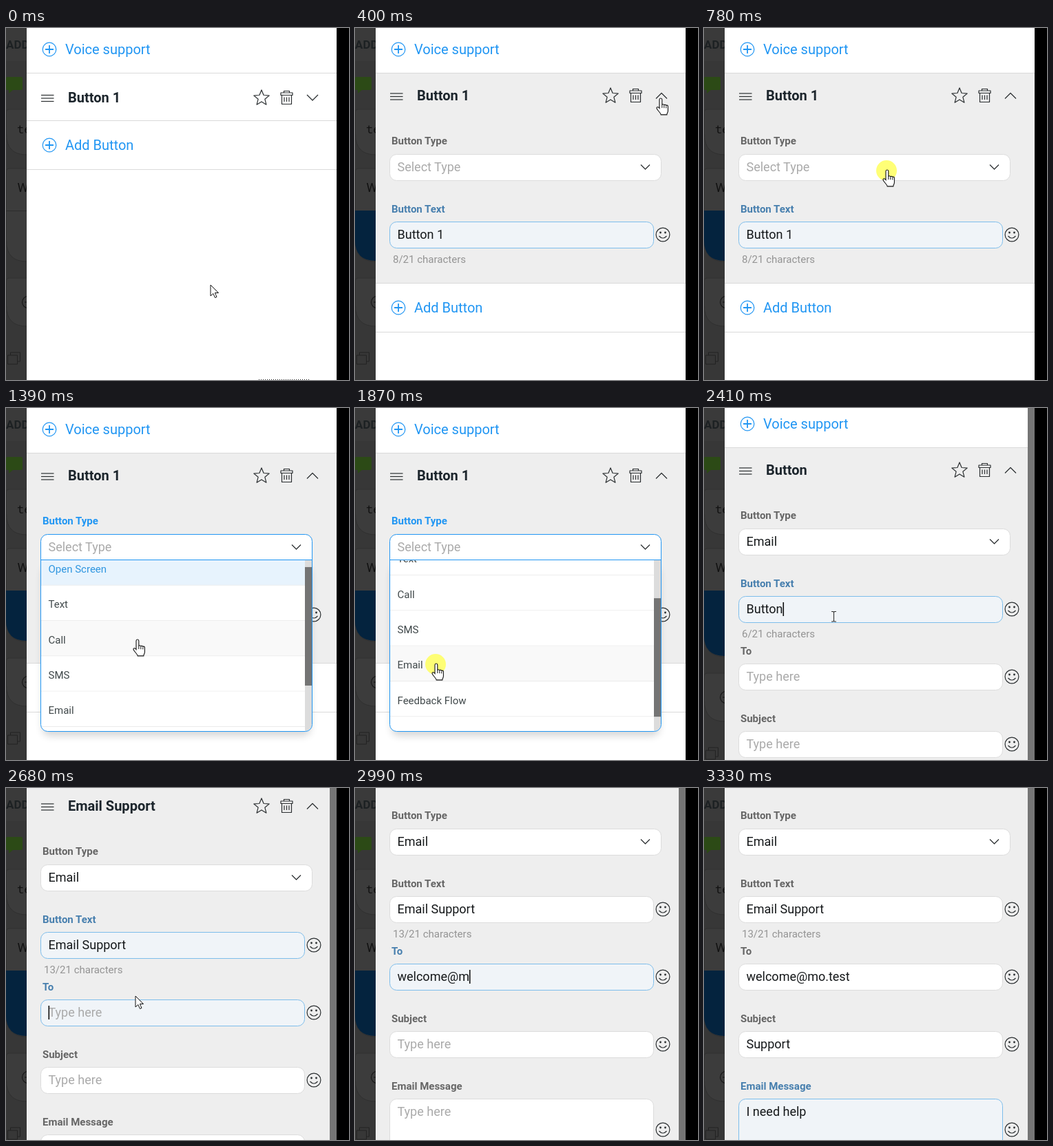
These frames come from a looping animation (498 px wide and 511 px high, 3410 ms). An HTML page:

```html
<!DOCTYPE html>
<html lang="en">
<head>
<meta charset="utf-8">
<title>Button editor</title>
<style>
  html, body { margin: 0; width: 100%; height: 100%; overflow: hidden; background: #000; }
  svg { display: block; width: 100vw; height: 100vh; font-family: Roboto, Arial, sans-serif; }
  .link { font-size: 20px; fill: #2196f3; }
  .title { font-size: 20px; font-weight: 700; fill: #1c252c; }
  .label { font-size: 15px; font-weight: 700; fill: #666; }
  .label.on { fill: #477fae; }
  .label.open { fill: #2196f3; }
  .value { font-size: 18px; fill: #15181a; }
  .hint { fill: #aaa; }
  .count { font-size: 15px; fill: #949494; }
  .item { font-size: 15px; fill: #41494b; }
  .icon { fill: none; stroke: #2b2f31; stroke-width: 1.2; stroke-linejoin: round; }
  .blue { fill: none; stroke: #2196f3; stroke-width: 1.2; }
</style>
</head>
<body>
<svg id="stage" viewBox="0 0 498 511">
  <defs>
    <clipPath id="list"><path d="M51 221H444V459a10 10 0 0 1-10 10H61a10 10 0 0 1-10-10z"/></clipPath>
    <clipPath id="strip"><rect width="30" height="511"/></clipPath>
    <clipPath id="panel"><rect x="30" width="450" height="511"/></clipPath>
    <filter id="soft" x="-10%" y="-10%" width="120%" height="120%"><feGaussianBlur stdDeviation="6"/></filter>
  </defs>
  <g id="back" clip-path="url(#strip)"></g>
  <g id="front" clip-path="url(#panel)"></g>
  <g id="mouse"></g>
</svg>
<script>
const LOOP = 3410;
const TIMES = [0, 90, 170, 240, 320, 400, 480, 550, 640, 710, 780, 860, 930, 1010, 1080, 1160,
  1240, 1310, 1390, 1470, 1550, 1630, 1710, 1790, 1870, 1960, 2030, 2110, 2190, 2260,
  2350, 2430, 2510, 2600, 2680, 2740, 2800, 2880, 2950, 3030, 3100, 3180, 3250, 3330];

// Steps at which the interface changes
const EXPAND = 5, OPEN = 11, CHOOSE = 25, FORM = 26;
const CLICKS = [4, 10, 24, 29];
const SCROLL = [[0, 0], [28, 8], [33, 40], [34, 72], [35, 98], [36, 124]];
const LIST = [[0, 0], [16, 6], [17, 14.5], [19, 30], [20, 50], [21, 68], [22, 80.5]];
const FOCUS = [[0, ''], [EXPAND, 'text'], [OPEN, ''], [29, 'text'], [34, 'text to'], [35, 'to'], [40, 'subject'], [42, 'message']];
const TYPED = {
  text: [[0, 'Button 1'], [30, 'Button'], [31, 'Ema'], [32, 'Email Sup'], [33, 'Email Support']],
  to: [[0, ''], [37, 'welc'], [38, 'welcome@m'], [39, 'welcome@mo.test']],
  subject: [[0, ''], [40, 'Sup'], [41, 'Support']],
  message: [[0, ''], [42, 'I need'], [43, 'I need help']]
};
const POINTER = [
  [0, 297, 373, 'arrow'], [3, 420, 140, 'arrow'], [4, 444, 101, 'hand'], [5, 444, 103, 'hand'],
  [7, 410, 165, 'arrow'], [9, 285, 200, 'hand'], [10, 266, 207, 'hand'], [11, 264, 208, 'hand'],
  [13, 249, 225, 'arrow'], [14, 240, 250, 'hand'], [18, 191, 337, 'hand'], [23, 118, 372, 'hand'],
  [25, 118, 372, 'arrow'], [28, 186, 303, 'beam'], [29, 189, 302, 'beam'], [31, 188, 302, 'none'],
  [33, 188, 302, 'arrow'], [36, 188, 302, 'none']
];
const SHAPES = {
  arrow: '<path d="M0 0V16L3.8 12.5L6.5 18.5L9 17.4L6.4 11.5H11.5Z" fill="#fff" stroke="#111"/>',
  hand: '<path d="M-2 1c0-2.6 3.8-2.6 3.8 0v8c0-1.8 3-1.6 3 .4c0-1.6 3-1.4 3 .5c0-1.4 2.6-1 2.6 1v6c0 3-1.6 3.6-1.6 6h-8.6c0-2-4.6-6-6-9c-.9-2 1.8-3.4 3.8-.4z" fill="#fff" stroke="#111" stroke-width="1.1"/><path d="M1.8 9v4M4.8 9.6v3.6M7.8 10.4v3" stroke="#111"/>',
  beam: '<path d="M-3.5-6.5H-1L0-5.5L1-6.5H3.5M0-5.5V7M-3.5 8H-1L0 7L1 8H3.5" fill="none" stroke="#333" stroke-width="1.1"/>',
  none: ''
};
const ITEMS = ['Open Screen', 'Text', 'Call', 'SMS', 'Email', 'Feedback Flow', 'Share'];
const ROW = 51.3;

const $ = id => document.getElementById(id);
const pen = document.createElement('canvas').getContext('2d');
const last = (list, i) => list.filter(e => e[0] <= i).pop();
const pick = (list, i) => last(list, i)[1];

const text = (x, y, cls, str) => `<text x="${x}" y="${y}" class="${cls}">${str}</text>`;
const rect = (x, y, w, h, fill, more = '') => `<rect x="${x}" y="${y}" width="${w}" height="${h}" fill="${fill}" ${more}/>`;
const path = (d, cls = 'icon') => `<path d="${d}" class="${cls}"/>`;
const rule = y => rect(30, y, 450, 1, '#dadada');

function link(y, str) {
  return `<circle cx="63" cy="${y}" r="9.8" class="blue"/>` +
    `<path d="M57 ${y}H69M63 ${y - 6}V${y + 6}" class="blue" style="stroke-width:1.8"/>` +
    text(86, y + 7, 'link', str);
}

function star(x, y) {
  const pts = Array.from({ length: 10 }, (_, k) => {
    const r = k % 2 ? 5.2 : 11.8, a = k * Math.PI / 5;
    return [x + r * Math.sin(a), y + .7 - r * Math.cos(a)].map(n => n.toFixed(1)).join(' ');
  });
  return path(`M${pts.join('L')}Z`);
}

function header(y, str, open) {
  const m = y + (open ? 1.5 : 1), c = open ? y + 4.5 : y - 4, tip = open ? -8 : 8;
  return [-4.5, 0, 4.5].map(d => path(`M51 ${m + d}H69.5`)).join('') +
    text(90, y + 7, 'title', str) + star(371, y) +
    path(`M399 ${y - 7}H416V${y - 3.5}H399ZM403.5 ${y - 7}V${y - 9.5}H411.5V${y - 7}` +
      `M400.5 ${y - 3.5}V${y + 9.5}H414.5V${y - 3.5}M404 ${y - .5}V${y + 6}M407.5 ${y - .5}V${y + 6}M411 ${y - .5}V${y + 6}`) +
    path(`M437 ${c}L445 ${c + tip}L453 ${c}`);
}

function smile(y) {
  return `<circle cx="447" cy="${y}" r="9.9" class="icon"/>` +
    `<circle cx="443.5" cy="${y - 3}" r="1.4" fill="#2b2f31"/><circle cx="450.5" cy="${y - 3}" r="1.4" fill="#2b2f31"/>` +
    path(`M441.5 ${y + 2}Q447 ${y + 8} 452.5 ${y + 2}`);
}

function field(i, key, label, y, h = 38) {
  const words = pick(FOCUS, i).split(' '), on = words.includes(key), str = pick(TYPED[key], i);
  let out = text(53, y - 13, on ? 'label on' : 'label', label) +
    rect(50.5, y + .5, 383, h, on ? '#f0f4f8' : '#fff', `rx="10" stroke="${on ? '#7dbdeb' : '#dcdcdc'}"`) +
    text(61.5, y + 25, str ? 'value' : 'value hint', str || 'Type here') +
    smile(h > 38 ? y + 45 : y + 19);
  if (i >= 29 && i < 43 && words[words.length - 1] === key) {
    pen.font = '18px Roboto, Arial, sans-serif';
    out += rect(61.5 + pen.measureText(str).width, y + 9, 1.6, 20, '#111');
  }
  return out;
}

function select(i) {
  const open = i >= OPEN && i < CHOOSE, done = i >= CHOOSE;
  return text(53, 169, open ? 'label open' : 'label', 'Button Type') +
    rect(50.5, 183.5, 394, 38, '#fff', 'rx="10" stroke="#dcdcdc"') +
    text(61.5, 208, done ? 'value' : 'value hint', done ? 'Email' : 'Select Type') +
    path('M415 198.5L421.5 205L428 198.5');
}

function dropdown(i, py) {
  const top = 221 - pick(LIST, i);
  const rows = ITEMS.map((str, k) => {
    const y = top + k * ROW, over = py > 221 && py >= y && py < y + ROW;
    const fill = k === 0 ? '#e7f3fd' : over ? '#f9f9f9' : '#fff';
    return rect(51, y, 383, ROW, fill) + rect(51, y + ROW - 1, 383, 1, '#ebebeb') +
      `<text x="61.5" y="${y + 32.5}" class="item"${k ? '' : ' style="fill:#2f96e0"'}>${str}</text>`;
  }).join('');
  return rect(53, 230, 389, 246, '#000', 'rx="10" opacity=".16" filter="url(#soft)"') +
    rect(50.5, 183.5, 394, 286, '#fff', 'rx="10"') +
    text(61.5, 208, 'value hint', 'Select Type') + path('M415 198.5L421.5 205L428 198.5') +
    `<g clip-path="url(#list)">${rows}${rect(434, 221, 10, 248, '#dcdcdc')}` +
    `${rect(434, 221 + (221 - top) * .685, 10, 172, '#747474')}</g>` +
    rect(50.5, 183.5, 394, 286, 'none', 'rx="10" stroke="#2196f3"') + rect(51, 220, 393, 1, '#2196f3');
}

function panel(i, py) {
  const open = i >= EXPAND, form = i >= FORM, name = pick(TYPED.text, i);
  let out = link(31, 'Voice support');
  if (!open) {
    out += rule(65) + header(101, name, false) + rule(134) + link(170, 'Add Button') + rule(205) +
      '<path d="M367 510.5H441" stroke="#222" stroke-dasharray="1 2"/>';
  } else {
    out += rect(30, 66, 450, form ? 800 : 304, '#eee') + rule(65) + header(98, name, true) +
      select(i) + field(i, 'text', 'Button Text', 281) +
      text(55, 341, 'count', `${name.length}/21 characters`);
    out += form
      ? field(i, 'to', 'To', 379) + field(i, 'subject', 'Subject', 477) + field(i, 'message', 'Email Message', 575, 90)
      : rule(370) + link(406, 'Add Button') + rule(441);
    if (i >= OPEN && i < CHOOSE) out += dropdown(i, py);
  }
  return rect(30, 0, 450, 511, '#fff') + `<g transform="translate(0 ${-pick(SCROLL, i)})">${out}</g>` +
    (form ? rect(470, 0, 10, 511, '#757575') : '');
}

function backdrop(i) {
  const grow = i >= FORM ? 22 : 0, blue = i >= EXPAND;
  const card = (y, end, fill) =>
    `<path d="M40 ${y}H4Q.5 ${y} .5 ${y + 4}V${end - 30}Q.5 ${end} 30 ${end}H40Z" fill="${fill}" stroke="#303030"/>`;
  const dark = (x, y, size, str, more = '') => `<text x="${x}" y="${y}" font-size="${size}" fill="#121212" ${more}>${str}</text>`;
  const line = 'fill="none" stroke="#1a1a1a" stroke-width="1.2"';
  return rect(0, 0, 30, 511, '#373737') + rect(0, 0, 30, 48, '#3a3a3a') +
    dark(0, 30, 17, 'ADD', 'font-weight="700" style="fill:#1d2123"') +
    '<path d="M2 71H22Q24 71 24 73V88Q24 90 22 90H10L4 95V90H2Q0 90 0 88V73Q0 71 2 71Z" fill="#2c4a16"/>' +
    card(118, 184, '#3c3c3c') + dark(16, 153, 17, 'te', 'font-family="Noto Sans Mono, monospace"') +
    card(204, 339 + (blue ? grow : 0), '#3c3c3c') + dark(16.5, 238, 18, 'W') +
    (blue ? `<path d="M0 265H40V${338 + grow}H30Q0 ${338 + grow} 0 ${308 + grow}Z" fill="#04233e"/>` : rect(0, 265, 30, 1, '#2c2c2c')) +
    card(363 + grow, 433 + grow, '#3c3c3c') +
    `<circle cx="32" cy="${398 + grow}" r="8.5" ${line}/><path d="M27 ${398 + grow}H37" ${line}/>` +
    `<path d="M2.5 ${475 + grow}H16.5V${488 + grow}H2.5ZM6.5 ${475 + grow}V${471 + grow}H20.5V${484 + grow}H16.5" fill="none" stroke="#222"/>`;
}

function pointer(i) {
  const a = last(POINTER, i), b = POINTER[POINTER.indexOf(a) + 1] || a;
  const k = b === a ? 0 : (i - a[0]) / (b[0] - a[0]);
  return { x: a[1] + (b[1] - a[1]) * k, y: a[2] + (b[2] - a[2]) * k, kind: a[3] };
}

function draw(i) {
  const p = pointer(i);
  $('back').innerHTML = backdrop(i);
  $('front').innerHTML = panel(i, p.y);
  $('mouse').innerHTML = `<g transform="translate(${p.x} ${p.y})">` +
    (CLICKS.includes(i) ? '<circle cx="-1" r="15" fill="#ffff50" opacity=".78"/>' : '') + SHAPES[p.kind] + '</g>';
}

const start = performance.now();
let shown = -1;
function tick() {
  const t = (performance.now() - start) % LOOP;
  const i = TIMES.filter(s => s <= t).length - 1;
  if (i !== shown) draw(shown = i);
  requestAnimationFrame(tick);
}
tick();
</script>
</body>
</html>
```
